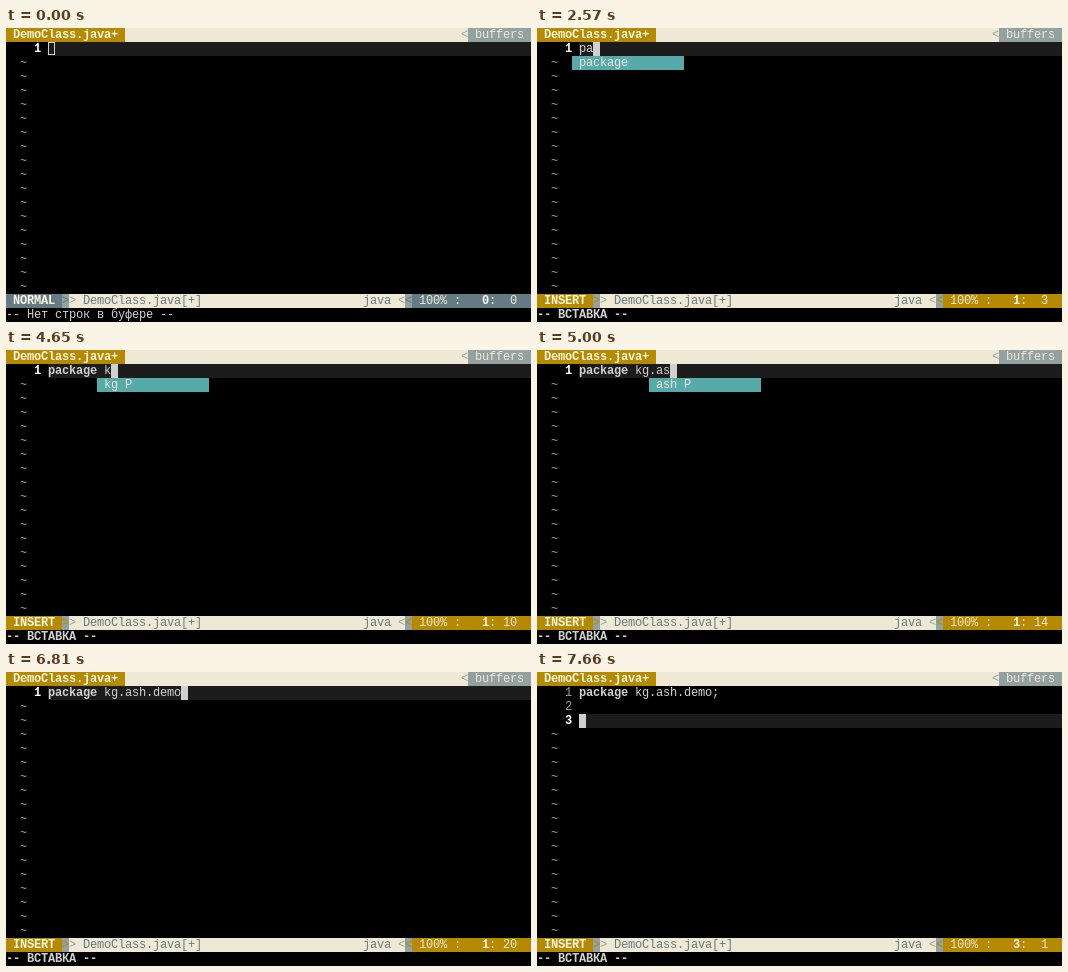
Recreate the animation shown at these times as an HTML page with a canvas. Size 525 by 294 pixels, loop 8 s.

```html
<!DOCTYPE html>
<html lang="ru">
<head>
<meta charset="utf-8">
<style>
html, body { margin: 0; width: 525px; height: 294px; overflow: hidden; background: #000; }
canvas { display: block; }
</style>
</head>
<body>
<canvas id="screen" width="525" height="294"></canvas>
<script>
const ctx = document.getElementById('screen').getContext('2d');
const W = 7, H = 14, LOOP = 8000, GUTTER = 6;
const GOLD = '#b58900', CREAM = '#eee8d5', GREY = '#93a1a1', SLATE = '#657b83',
      TEXT = '#d0d0d0', TEAL = '#56aaaa';
const FOCUS = 690, POINTER = [730, 1160], INSERT = 1630;

// [time, typed text]
const typing = [
  [0, ''],
  [2480, 'p'], [2570, 'pa'], [2660, 'pac'], [2840, 'pack'], [3590, 'packa'],
  [3740, 'packag'], [3830, 'package'], [3920, 'package '],
  [4650, 'package k'], [4720, 'package kg'], [4790, 'package kg.'],
  [4930, 'package kg.a'], [5000, 'package kg.as'], [5840, 'package kg.ash'],
  [6000, 'package kg.ash.'], [6370, 'package kg.ash.d'], [6480, 'package kg.ash.de'],
  [6670, 'package kg.ash.dem'], [6810, 'package kg.ash.demo'],
  [7050, 'package kg.ash.demo;'], [7250, 'package kg.ash.demo;\n'],
  [7660, 'package kg.ash.demo;\n\n']
];

// [from, to, column, label]
const menus = [
  [2570, 2840, 5, 'package'], [4650, 4790, 13, 'kg P'],
  [4860, 6000, 16, 'ash P'], [6080, 6370, 20, 'javavi P']
];

function fill(col, row, cols, color) {
  ctx.fillStyle = color;
  ctx.fillRect(col * W, row * H, cols * W, H);
}

// Each character sits on the terminal grid.
function put(col, row, text, color, bold) {
  ctx.font = (bold ? 'bold ' : '') + '12px "Liberation Mono", monospace';
  ctx.fillStyle = color;
  [...text].forEach((ch, i) => ctx.fillText(ch, (col + i) * W, row * H + 10));
}

function drawTabs() {
  fill(0, 0, 75, CREAM);
  fill(0, 0, 17, GOLD);
  put(1, 0, 'DemoClass.java+', '#fdf6e3', true);
  put(65, 0, '<', GREY);
  fill(66, 0, 9, GREY);
  put(67, 0, 'buffers', CREAM);
}

function drawStatus(insert, line, col) {
  const mode = insert ? GOLD : SLATE;
  fill(0, 19, 75, CREAM);
  fill(0, 19, 8, mode);
  fill(8, 19, 1, GREY);
  put(1, 19, insert ? 'INSERT' : 'NORMAL', '#fdf6e3', true);
  put(8, 19, '>', mode);
  put(9, 19, '>', GREY);
  put(11, 19, 'DemoClass.java[+]', SLATE);
  put(51, 19, 'java', SLATE);
  put(56, 19, '<', GREY);
  fill(57, 19, 1, GREY);
  put(57, 19, '<', mode);
  fill(58, 19, 17, mode);
  put(59, 19, '100% :', CREAM);
  put(68, 19, String(line), '#fdf6e3', true);
  put(69, 19, ':' + String(col).padStart(3), CREAM);
  if (insert) put(0, 20, '-- ВСТАВКА --', TEXT, true);
  else put(0, 20, '-- Нет строк в буфере --', TEXT);
}

function drawCode(lines) {
  const last = lines.length;
  fill(GUTTER, last, 69, '#1c1c1c');
  lines.forEach((text, i) => {
    const row = i + 1, current = row === last;
    put(4, row, String(row), current ? '#fff' : '#a0a0a0', current);
    const keyword = text.match(/^package\b/) ? 7 : 0;
    put(GUTTER, row, text.slice(0, keyword), TEXT, true);
    put(GUTTER + keyword, row, text.slice(keyword), TEXT);
  });
  for (let row = last + 1; row < 19; row++) put(2, row, '~', '#a0a0a0');
}

function drawCursor(col, row, focused) {
  if (focused) return fill(col, row, 1, TEXT);
  ctx.strokeStyle = TEXT;
  ctx.lineWidth = 1;
  ctx.strokeRect(col * W + .5, row * H + .5, W - 1, H - 2);
}

function drawPointer() {
  ctx.fillStyle = '#ddd';
  ctx.fillRect(286, 27, 1, 14);
  ctx.fillRect(283, 26, 7, 1);
  ctx.fillRect(283, 41, 7, 1);
}

function draw() {
  const t = performance.now() % LOOP;
  const text = typing.findLast(([at]) => t >= at)[1];
  const lines = text.split('\n');
  const row = lines.length, length = lines[row - 1].length;
  const insert = t >= INSERT;

  ctx.fillStyle = '#000';
  ctx.fillRect(0, 0, 525, 294);
  drawTabs();
  drawCode(lines);
  drawCursor(GUTTER + length, row, t >= FOCUS);
  drawStatus(insert, text ? row : 0, insert ? length + 1 : 0);

  const menu = menus.find(([from, to]) => t >= from && t < to);
  if (menu) {
    fill(menu[2], row + 1, 16, TEAL);
    put(menu[2] + 1, row + 1, menu[3], CREAM);
  }
  if (t >= POINTER[0] && t < POINTER[1]) drawPointer();
  requestAnimationFrame(draw);
}
draw();
</script>
</body>
</html>
```
